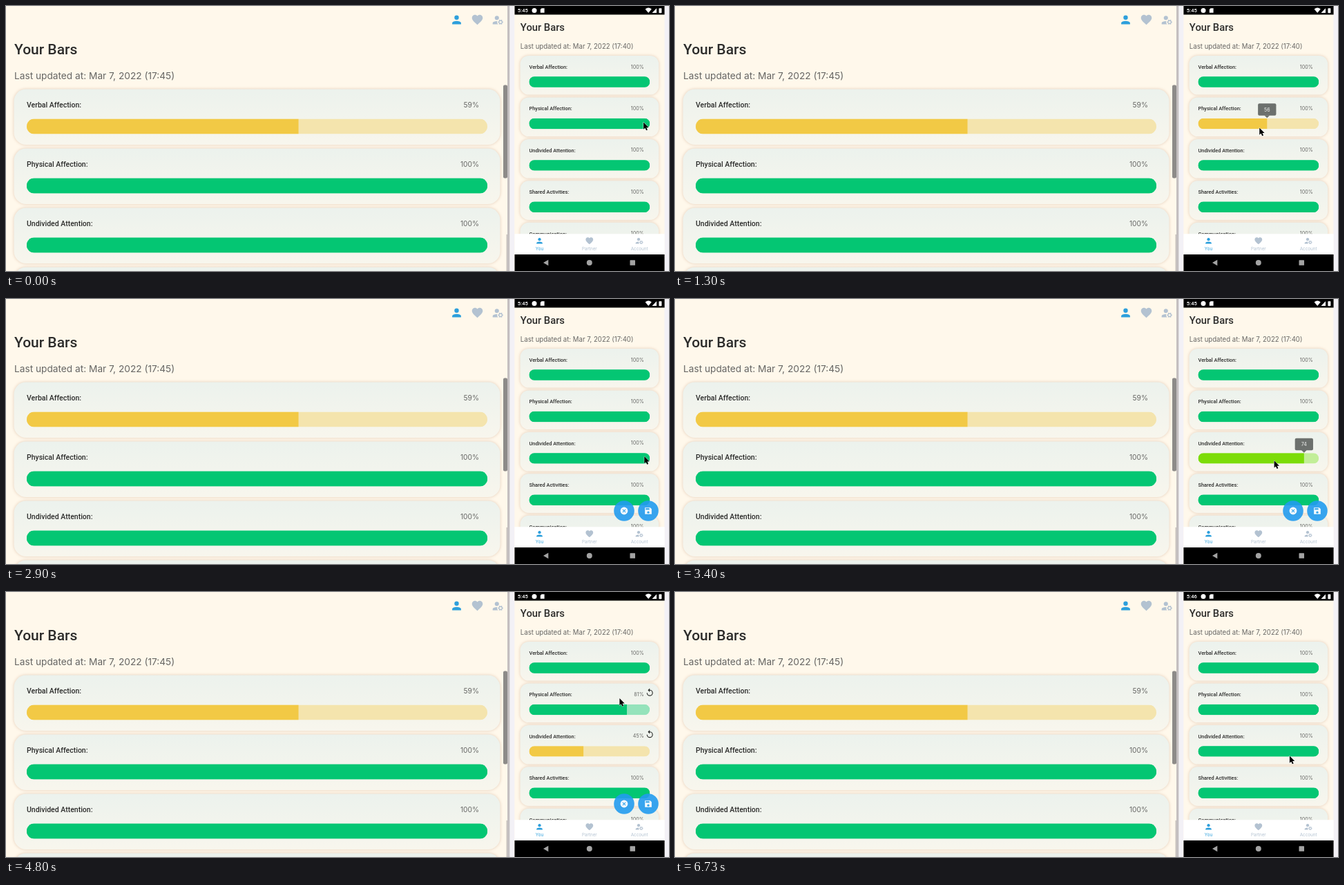
An HTML page with a canvas that plays this animation: 960x384 px, repeating every 6.85 s.

```html
<!DOCTYPE html>
<html lang="en">
<head>
<meta charset="utf-8">
<title>Your Bars</title>
<style>
html, body { margin: 0; width: 100%; height: 100%; overflow: hidden; background: #fff8eb; }
canvas { display: block; }
</style>
</head>
<body>
<canvas id="stage" width="960" height="384"></canvas>
<script>
const ctx = document.getElementById('stage').getContext('2d');
const LOOP = 6850, STEP = 100, LAG = 85, TAU = 2 * Math.PI;
const ROBOTO = 'Roboto, sans-serif', INTER = 'Inter, sans-serif';
const CREAM = '#fff8eb', BLUE = '#2d9fdc', MUTED = '#b3c2d1', INK = '#2c2c2b', GREY = '#666664';
const LABELS = ['Verbal', 'Physical', 'Undivided', 'Shared', 'Communication']
  .map((word, i) => word + [' Affection:', ' Affection:', ' Attention:', ' Activities:', ':'][i]);

// Both screens share one layout, scaled; lengths are in unscaled card units.
const BROWSER = { x: 11.5, y: 120.5, width: 704, scale: 1 };
const PHONE = { x: 744.5, y: 72, width: 285.5, scale: 0.703 };
const PITCH = 86, PAD = 18.5, BAR_TOP = 43, BAR_H = 22;

const RESET = 2300, CANCEL = 6300;
const DRAGS = [
  { row: 1, from: 500, to: 1350, level: 56, undo: RESET },
  { row: 2, from: 3250, to: 3800, level: 45, undo: CANCEL },
  { row: 1, from: 4250, to: 4700, level: 81, undo: CANCEL },
  { row: 0, from: 5200, to: 5800, level: 47, undo: CANCEL }
];

const clamp = v => Math.min(1, Math.max(0, v));
const mix = (a, b, p) => a + (b - a) * p;
const easeOut = p => 1 - (1 - p) ** 2;
const progress = (d, t) => easeOut(clamp((t - d.from) / (d.to - d.from)));
const dragged = (d, t) => mix(100, d.level, progress(d, t));

// The bar's edge trails the value; the value sets colour and number.
function rowState(row, t) {
  const d = DRAGS.filter(d => d.row === row && d.from <= t).pop();
  if (!d) return { value: 100, edge: 100, percent: 100 };
  const undone = t >= d.undo, settled = t >= d.undo + 1.5 * STEP;
  const changed = t >= d.to && !undone;
  return {
    value: undone ? 100 : dragged(d, t),
    edge: settled ? 100 : dragged(d, t - LAG),
    percent: changed ? d.level : 100,
    icon: t >= d.to && !settled && t < CANCEL,
    tip: t < d.to
  };
}

function grip(d, t) {
  const x = PHONE.x + PHONE.scale * mix(PAD, PHONE.width - PAD, dragged(d, t + LAG / 2) / 100);
  const y = PHONE.y + PHONE.scale * (d.row * PITCH + BAR_TOP + BAR_H / 2);
  return [x - 9.5, y + mix(-2.5, 5.5, progress(d, t + LAG))];
}

const STOPS = [
  ...DRAGS.flatMap(d => [[d.from - 250, ...grip(d, d.from - LAG)], [d.to, ...grip(d, d.to)]]),
  [2000, 933, 143.5], [2200, 933, 143.5], [2300, 931, 222],
  [4800, 888, 153.5], [6100, 894, 306], [CANCEL, 894, 306], [6600, 889.5, 237]
].sort((a, b) => a[0] - b[0]);

function pointerAt(t) {
  const drag = DRAGS.find(d => t >= d.from && t < d.to);
  if (drag) return grip(drag, t);
  const next = STOPS.findIndex(s => s[0] > t);
  if (next < 0) return STOPS[STOPS.length - 1].slice(1);
  const a = STOPS[Math.max(0, next - 1)], b = STOPS[next];
  const p = clamp((t - a[0]) / (b[0] - a[0] || 1));
  return [mix(a[1], b[1], p), mix(a[2], b[2], p)];
}

function rect(x, y, w, h, color, r = 0) {
  ctx.fillStyle = color;
  ctx.beginPath();
  ctx.roundRect(x, y, w, h, r);
  ctx.fill();
}

function disc(x, y, r, color) {
  ctx.fillStyle = color;
  ctx.beginPath();
  ctx.arc(x, y, r, 0, TAU);
  ctx.fill();
}

function poly(color, ...points) {
  ctx.fillStyle = color;
  ctx.beginPath();
  for (const [x, y] of points) ctx.lineTo(x, y);
  ctx.fill();
}

function text(str, x, y, size, family, color, weight = 400, align = 'left') {
  ctx.font = `${weight} ${size}px ${family}`;
  ctx.fillStyle = color;
  ctx.textAlign = align;
  ctx.fillText(str, x, y);
}

function placed(x, y, scale, draw) {
  ctx.save();
  ctx.translate(x, y);
  ctx.scale(scale, scale);
  draw();
  ctx.restore();
}

// Icons are drawn around the origin, about 20 units wide.
function person(color) {
  disc(0, -4, 4, color);
  ctx.beginPath();
  ctx.moveTo(-8, 8);
  ctx.lineTo(-8, 6);
  ctx.bezierCurveTo(-8, 1, 8, 1, 8, 6);
  ctx.lineTo(8, 8);
  ctx.fill();
}

function heart(color) {
  ctx.fillStyle = color;
  ctx.beginPath();
  ctx.moveTo(0, 9.3);
  for (const s of [-1, 1]) {
    ctx.bezierCurveTo(s * 7, 3, s * 10, 0, s * 10, -3.5);
    ctx.bezierCurveTo(s * 10, -10, s * 2.5, -11, 0, -6.9);
    ctx.lineTo(0, 9.3);
  }
  ctx.fill();
}

function account(color, paper) {
  placed(-2, 0, 1, () => person(color));
  disc(5, 4, 6.5, paper);
  const teeth = Array.from({ length: 24 }, (_, i) => {
    const r = i % 4 < 2 ? 5 : 3.7, a = (i - 0.5) * TAU / 24;
    return [5 + r * Math.cos(a), 4 + r * Math.sin(a)];
  });
  poly(color, ...teeth);
  disc(5, 4, 2, paper);
}

function replay(color) {
  ctx.strokeStyle = color;
  ctx.lineWidth = 2;
  ctx.beginPath();
  ctx.arc(0, 2, 7, -TAU / 4, TAU / 2);
  ctx.stroke();
  poly(color, [0, -10], [-5, -5], [0, 0]);
}

function save(color, paper) {
  poly(color, [-9, -9], [5, -9], [9, -5], [9, 9], [-9, 9]);
  rect(-7, -7, 10, 4, paper);
  disc(0, 4, 3, paper);
}

function cancel(color, paper) {
  disc(0, 0, 10, color);
  ctx.strokeStyle = paper;
  ctx.lineWidth = 2;
  ctx.beginPath();
  for (const s of [-1, 1]) {
    ctx.moveTo(-4, -4 * s);
    ctx.lineTo(4, 4 * s);
  }
  ctx.stroke();
}

function barColors(value) {
  if (value >= 80) return ['#04c673', '#95e3bb'];
  if (value >= 60) return ['#7cdc08', '#c2ee98'];
  return ['#f2c945', '#f4e4ad'];
}

function card(label, width, { value, edge, percent, icon, tip }) {
  const fill = ctx.createLinearGradient(0, 0, 0, 80.5);
  fill.addColorStop(0, '#ecf2ed');
  fill.addColorStop(1, '#f8f6ed');
  ctx.save();
  ctx.shadowColor = 'rgba(190,140,110,.42)';
  ctx.shadowBlur = 4;
  rect(0, 0, width, 80.5, fill, 17.5);
  ctx.restore();
  text(label, PAD, 26.6, 10.5, ROBOTO, INK, 500);
  text(percent + '%', width - 30.6, 26.4, 10.2, INTER, GREY, 400, 'right');

  const [solid, pale] = barColors(value);
  const barW = width - 2 * PAD, edgeX = PAD + barW * edge / 100;
  ctx.save();
  ctx.beginPath();
  ctx.roundRect(PAD, BAR_TOP, barW, BAR_H, BAR_H / 2);
  ctx.clip();
  rect(PAD, BAR_TOP, barW, BAR_H, edge < 100 ? pale : solid);
  rect(PAD, BAR_TOP, edgeX - PAD, BAR_H, solid);
  ctx.restore();

  if (icon) placed(267, 18, 0.8, () => replay('#252725'));
  if (tip) {
    rect(edgeX - 18.7, 12.5, 37.4, 25, '#6c706d', 3);
    poly('#6c706d', [edgeX - 5.5, 37], [edgeX + 5.5, 37], [edgeX, 42.5]);
    text(Math.round(value), edgeX, 29, 10.2, INTER, '#eef0ee', 400, 'center');
  }
}

function page(layout, updated, rows, stateOf) {
  placed(layout.x, layout.y, layout.scale, () => {
    text('Your Bars', 0.5, -51, 21, ROBOTO, INK, 500);
    text(`Last updated at: Mar 7, 2022 (${updated})`, 0.5, -14.7, 13.7, INTER, GREY);
    for (let row = 0; row < rows; row++) {
      placed(0, row * PITCH, 1, () => card(LABELS[row], layout.width, stateOf(row)));
    }
  });
}

function browser() {
  rect(0, 0, 727, 384, CREAM);
  placed(652.5, 20, 0.8, () => person(BLUE));
  placed(682.5, 20, 0.78, () => heart(MUTED));
  placed(712.3, 20.3, 0.76, () => account(MUTED, CREAM));
  page(BROWSER, '17:45', 4, row => {
    const level = row ? 100 : 59;
    return { value: level, edge: level, percent: level };
  });
  rect(720, 114.5, 6, 135, '#8d8b89', 2);
  rect(724.5, 331, 1.5, 53, '#c9c4be');
  rect(726, 0, 3.5, 384, '#c4bfc0');
  rect(729.5, 0, 7, 384, '#f3f1f6');
}

function statusBar(t) {
  rect(736.5, 0, 217, 12.6, '#000');
  text(t >= 5200 ? '5:46' : '5:45', 740.8, 9.2, 7.6, ROBOTO, '#fff', 500);
  disc(765, 6.5, 3.5, '#fff');
  poly('#fff', [775.6, 3.2], [779.6, 3.2], [779.6, 9.8], [773.8, 9.8], [773.8, 5]);
  ctx.beginPath();
  ctx.moveTo(930.2, 10);
  ctx.arc(930.2, 10, 7.2, -TAU * 0.36, -TAU * 0.14);
  ctx.fill();
  poly('#fff', [935.5, 10], [942, 3.2], [942, 10]);
  rect(945.4, 3.2, 4, 7, '#fff', 0.6);
}

function phoneNav() {
  rect(736.5, 330.3, 217, 30, '#fff');
  const tabs = [['You', person, BLUE], ['Partner', heart, MUTED], ['Account', account, MUTED]];
  tabs.forEach(([name, icon, color], i) => {
    const x = 772.5 + 72.3 * i;
    placed(x, 340.3, 0.54, () => icon(color, '#fff'));
    text(name, x, 354, 6.3, INTER, color, 400, 'center');
  });
  rect(736.5, 360, 217, 24, '#000');
  poly('#a3a3a3', [778, 372], [785.3, 367.8], [785.3, 376.2]);
  disc(844.8, 372, 4, '#a3a3a3');
  rect(903.5, 368.3, 7.5, 7.5, '#a3a3a3', 0.6);
}

function floatingButtons() {
  [cancel, save].forEach((icon, i) => {
    const x = 895 + 35 * i;
    disc(x, 307, 14.8, 'rgba(33,155,238,.9)');
    placed(x, 307, 0.54, () => icon('#f4fafd', '#36a5ea'));
  });
}

function phone(t) {
  rect(736.5, 0, 217, 384, CREAM);
  rect(953.5, 0, 6.5, 384, '#f3f1f6');
  page(PHONE, '17:40', LABELS.length, row => rowState(row, t));
  if (t >= DRAGS[0].to && t < CANCEL) floatingButtons();
  statusBar(t);
  phoneNav();
}

function pointer(t) {
  const [x, y] = pointerAt(t);
  placed(x + 0.4, y + 0.6, 0.92, () => {
    const arrow = new Path2D('M0 0V11L2.5 8.8 4.3 12.7 6.3 11.8 4.5 8.1H8Z');
    ctx.lineJoin = 'round';
    ctx.strokeStyle = '#fff';
    ctx.stroke(arrow);
    ctx.fillStyle = '#000';
    ctx.fill(arrow);
  });
}

function frame(now) {
  const t = Math.floor((now % LOOP) / STEP) * STEP;
  browser();
  phone(t);
  pointer(t);
  requestAnimationFrame(frame);
}
requestAnimationFrame(frame);
</script>
</body>
</html>
```
